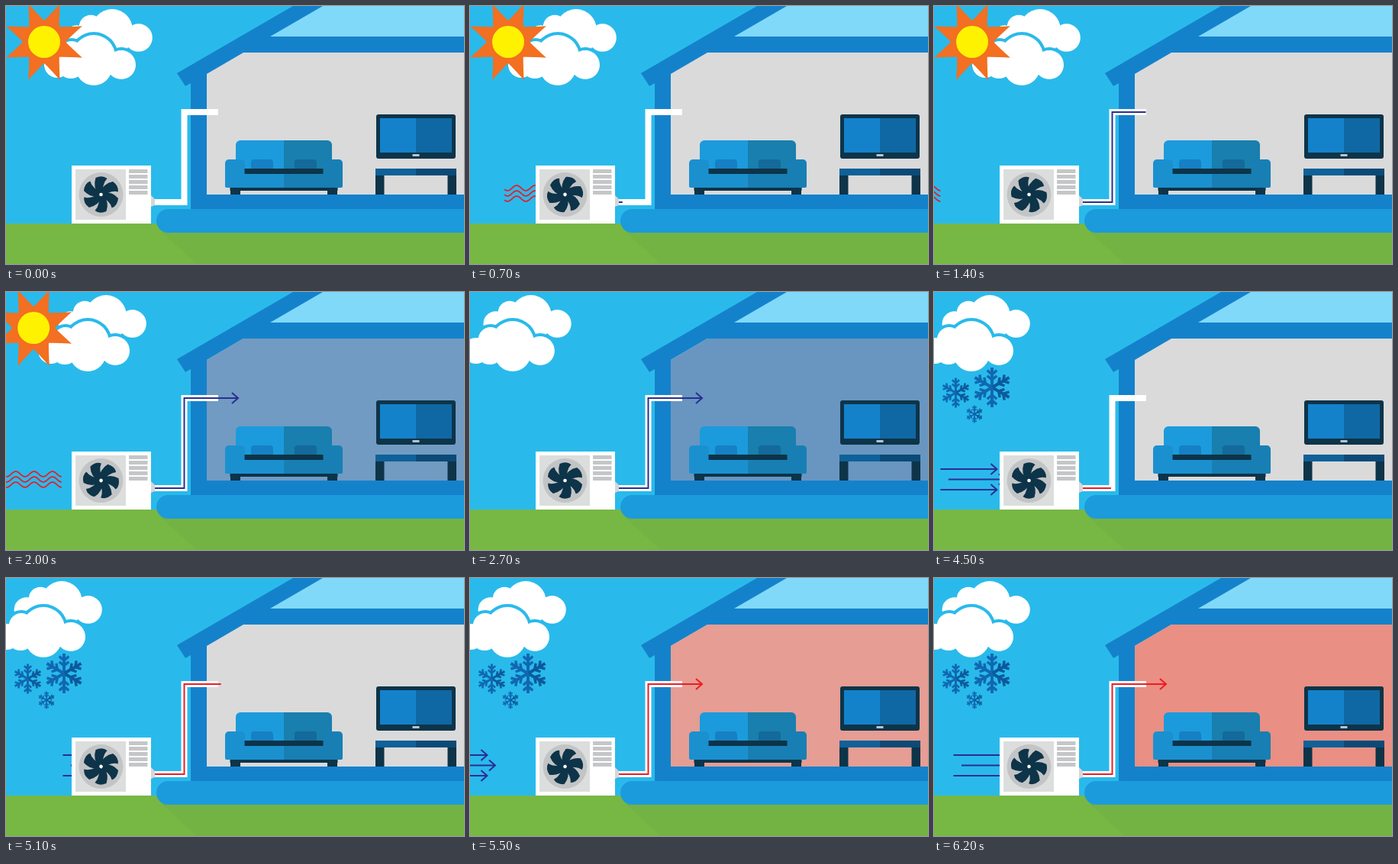
These frames come from a looping animation (600 px wide and 338 px high, 6.3 s). An HTML page with a canvas:

```html
<!DOCTYPE html>
<html>
<head>
<meta charset="utf-8">
<style>
html, body { margin: 0; width: 600px; height: 338px; overflow: hidden; }
canvas { display: block; }
</style>
</head>
<body>
<canvas id="stage" width="600" height="338"></canvas>
<script>
const ctx = document.getElementById('stage').getContext('2d');
const LOOP = 6300, STEP = 100, TAU = 2 * Math.PI;
const SKY = '#29baeb', WALL = '#1482cb', DARK = '#0d3449', WHITE = '#fff';
const INDIGO = '#2b2e91', RED = '#ee1c24';

const ramp = (t, from, to) => Math.max(0, Math.min(1, (t - from) / (to - from)));
const ease = v => v * v * (3 - 2 * v);
const polar = (r, a) => [r * Math.cos(a), r * Math.sin(a)];

function rect(color, x, y, w, h, radius = 0) {
  ctx.fillStyle = color;
  ctx.beginPath();
  ctx.roundRect(x, y, w, h, radius);
  ctx.fill();
}

function trace(points) {
  ctx.beginPath();
  points.forEach(([x, y]) => ctx.lineTo(x, y));
}

function poly(color, ...points) {
  trace(points);
  ctx.fillStyle = color;
  ctx.fill();
}

function line(color, width, ...points) {
  trace(points);
  ctx.strokeStyle = color;
  ctx.lineWidth = width;
  ctx.stroke();
}

function circle(color, x, y, r) {
  ctx.fillStyle = color;
  ctx.beginPath();
  ctx.arc(x, y, r, 0, TAU);
  ctx.fill();
}

function at(x, y, draw) {
  ctx.save();
  ctx.translate(x, y);
  draw();
  ctx.restore();
}

// Repeats a drawing around the current centre
function spin(count, draw) {
  for (let i = 0; i < count; i++) {
    draw(i);
    ctx.rotate(TAU / count);
  }
}

// Box centred on x = 0, with a lit left half and a shaded right half
function box(lit, shaded, y, w, h, radius) {
  const halves = ctx.createLinearGradient(-1, 0, 1, 0);
  halves.addColorStop(.5, lit);
  halves.addColorStop(.5, shaded);
  rect(halves, -w / 2, y, w, h, radius);
}

// Two boxes mirrored about x = 0
function pair(lit, shaded, x, y, w, h, radius) {
  rect(lit, -x - w, y, w, h, radius);
  rect(shaded, x, y, w, h, radius);
}

function chevron(color, x, y) {
  line(color, 2, [x - 8, y - 7], [x, y], [x - 8, y + 7]);
}

function drawSnowflake(x, y, r) {
  at(x, y, () => spin(6, i => {
    const color = i > 0 && i < 3 ? '#0b5a9c' : '#1068b0';
    line(color, r * .15, [0, 0], [0, -r]);
    for (const d of [.38, .65])
      line(color, r * .13, [-r * .24, -r * (d + .21)], [0, -r * d], [r * .24, -r * (d + .21)]);
  }));
}

function drawCloud(x, y, scale) {
  const lobes = [[0, 0, 28], [36, 11, 19], [0, 14, 24], [-30, 11, 18], [-48, 11, 17], [-29, -4, 16]];
  at(x, y, () => {
    ctx.scale(scale, scale);
    lobes.forEach(([cx, cy, r]) => circle(SKY, cx, cy, r + 4));
    lobes.forEach(lobe => circle(WHITE, ...lobe));
  });
}

function drawSun(x) {
  at(x, 47, () => {
    ctx.fillStyle = '#f36f21';
    ctx.beginPath();
    for (let i = 0; i < 8; i++) {
      const tip = (i + .5) * TAU / 8;
      ctx.lineTo(...polar(28, tip - TAU / 16));
      ctx.quadraticCurveTo(...polar(35, tip - .2), ...polar(54, tip));
      ctx.quadraticCurveTo(...polar(35, tip + .2), ...polar(28, tip + TAU / 16));
    }
    ctx.fill();
    circle('#fff200', 0, 0, 21);
  });
}

function drawWeather(t) {
  const move = ease(ramp(t, 1740, 2940));
  if (t >= 2900) {
    const lift = 70 * (1 - ease(ramp(t, 2900, 3710)));
    drawSnowflake(76, 125 - lift, 26);
    drawSnowflake(28.5, 132 - lift, 19.5);
    drawSnowflake(53, 160 - lift, 11.5);
  }
  drawCloud(139 - 66 * move, 31, .96);
  drawCloud(115 - 66 * move, 66, 1);
  drawSun(50 - 115 * move);
}

function drawHouse(t) {
  poly(WALL, [224, 88], [376, 0], [600, 0], [600, 267], [242, 267], [242, 101], [235, 105]);
  poly('#80d9f9', [346, 40], [415, 0], [600, 0], [600, 40]);
  const room = [[263, 247], [263, 89], [311, 61], [600, 61], [600, 247]];
  poly('#dadadb', ...room);
  ctx.globalAlpha = ramp(t, 1450, 2050) * (1 - ramp(t, 2700, 3200));
  poly('#6896c0', ...room);
  ctx.globalAlpha = ramp(t, 5100, 5600);
  poly('#e98f83', ...room);
  ctx.globalAlpha = 1;
  rect('#1b9bdc', 197, 266, 420, 31, 15.5);
}

function drawSofa() {
  box('#1b9bdc', '#187fae', 176, 126, 50, 6);
  pair('#1b90cf', '#187fb4', 51, 201, 26, 37, 5);
  box('#1b90cf', '#187fb4', 219, 154, 19, 2);
  pair('#1680c4', '#136a9b', 14, 201, 29, 14, 4);
  box(DARK, DARK, 213, 103, 7);
  box(DARK, DARK, 238, 141, 4);
  pair(DARK, DARK, 57, 238, 13, 9);
}

function drawTelevision() {
  box(DARK, DARK, 142, 104, 58, 3);
  box('#1482cb', '#0f68a4', 147, 94, 45);
  box('#b5c5cf', '#b5c5cf', 194, 9, 3);
  box('#0f6199', '#0b4a77', 213, 106, 9);
  pair(DARK, DARK, 41.5, 222, 11.5, 25);
}

const PIPE = [[190, 257], [233.5, 257], [233.5, 139], [278, 139]];

function drawFlow(color, length) {
  if (length <= 0) return;
  ctx.setLineDash([length, 999]);
  line(color, 2, ...PIPE.slice(0, 3), [304, 139]);
  ctx.setLineDash([]);
  if (length >= 225) chevron(color, 304, 139);
}

function drawPipe(t) {
  line(WHITE, 8, ...PIPE);
  ctx.globalAlpha = 1 - ramp(t, 2700, 3200);
  drawFlow(INDIGO, 232 * ramp(t, 665, 1495));
  ctx.globalAlpha = 1;
  drawFlow(RED, 232 * ramp(t, 4350, 5180));
}

// Warm air leaving the unit, two passes
function drawWaves(t) {
  if (t < 440 || t > 2440) return;
  const right = 163 - .161 * ((t - 440) % 1000);
  for (let row = 0; row < 3; row++) {
    const points = [];
    for (let d = 0; d <= 76; d++)
      points.push([right - d, 238.5 + 7 * row + 3.4 * Math.cos(d * TAU / 24)]);
    line('#e5202b', 1.8, ...points);
  }
}

// Cold air drawn into the unit
function drawArrows(t) {
  if (t < 3660) return;
  const travel = .11 * ((t - 3660) % 1545) - 10;
  for (let row = 0; row < 3; row++) {
    const head = travel + (row === 1 ? 10.5 : 0), y = 232 + 13.5 * row;
    line(INDIGO, 2, [head - 74, y], [head, y]);
    chevron(INDIGO, head, y);
  }
}

function drawFan(t) {
  ctx.rotate(t * TAU / 1800);
  ctx.fillStyle = DARK;
  spin(6, () => {
    ctx.beginPath();
    ctx.moveTo(-3, 0);
    ctx.quadraticCurveTo(-11, -10, -7, -22);
    ctx.quadraticCurveTo(2, -26, 8, -21);
    ctx.quadraticCurveTo(1, -14, 3, 0);
    ctx.fill();
  });
  circle(DARK, 0, 0, 6);
  circle(WHITE, 0, 0, 2.3);
}

function drawUnit(t) {
  poly('#d5d7d9', [190, 248], [195, 253], [195, 261], [190, 263]);
  rect(WHITE, 86, 209, 104, 76);
  rect('#dcdddd', 91, 214, 66, 66);
  for (let i = 0; i < 5; i++) rect('#c5c6c7', 161, 214 + 7 * i, 24.5, 5);
  circle('#c3c4c5', 124.5, 247, 29);
  at(124.5, 247, () => drawFan(t));
}

function draw(t) {
  rect(SKY, 0, 0, 600, 338);
  rect('#77b744', 0, 285, 600, 53);
  poly('#73b344', [204, 296], [250, 338], [600, 338], [600, 296]);
  drawWeather(t);
  drawHouse(t);
  at(364, 0, drawSofa);
  at(537, 0, drawTelevision);
  drawWaves(t);
  drawArrows(t);
  drawPipe(t);
  drawUnit(t);
}

const start = performance.now();
function tick() {
  const t = (performance.now() - start) % LOOP;
  draw(Math.floor(t / STEP) * STEP);
  requestAnimationFrame(tick);
}
tick();
</script>
</body>
</html>
```
